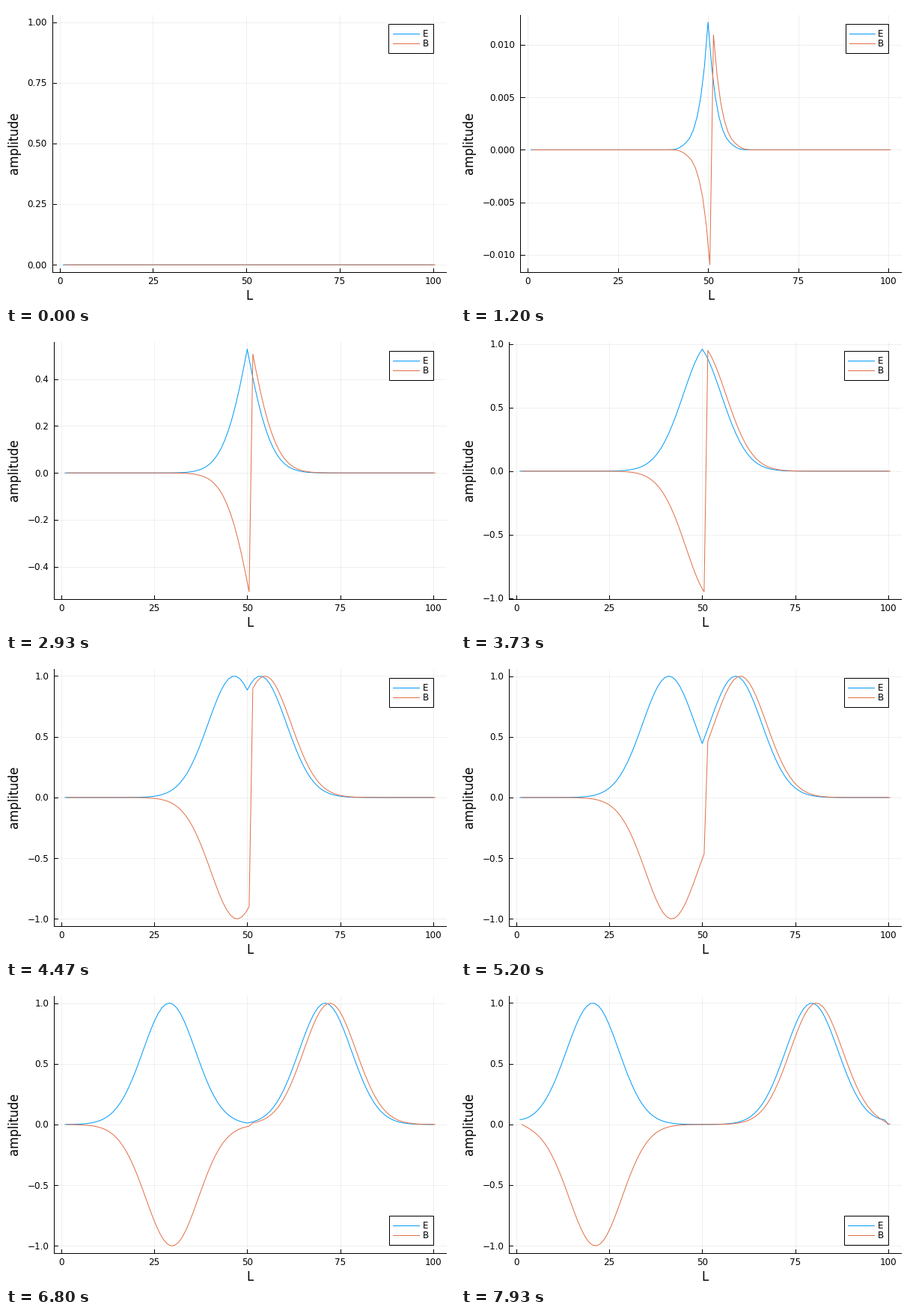
A matplotlib script for the animation above (8 s loop, 600 by 400 pixels).

```python
import math

import matplotlib.pyplot as plt
import numpy as np
from matplotlib.animation import FuncAnimation
from matplotlib.patches import Rectangle

W, H = 600, 400
STEPS, FRAMES, LOOP_MS = 120, 400, 8000
CELLS, SOURCE = 100, 50
TOP, BOTTOM, RIGHT = 11.81, 356.0, 588.19
PT = 0.72                       # points per pixel at 100 dpi
SMALL, LARGE = 12, 16.5         # font sizes in pixels
CAP_HALF = 0.3645               # half the digit height, in em
BLUE, ORANGE = "#009afa", "#e26f47"
NICE = ((1.0, 1.0), (5.0, 0.9), (2.0, 0.7), (2.5, 0.5), (3.0, 0.2))

xe = np.arange(1, CELLS + 1)
xb = xe + 0.5


def simulate():
    """One-dimensional field update driven by a Gaussian pulse in the middle."""
    e, b = np.zeros(CELLS + 1), np.zeros(CELLS + 1)
    states = [(e[1:].copy(), b[1:].copy())]
    for n in range(1, STEPS):
        e[1:CELLS] -= 0.5 * (b[2:] - b[1:CELLS])
        e[SOURCE] = math.exp(-((n - 60) / 20) ** 2)
        b[2:CELLS] -= 0.5 * (e[2:CELLS] - e[1:CELLS - 1])
        states.append((e[1:].copy(), b[1:].copy()))
    return states


def padded(lo, hi):
    if lo == hi:
        lo, hi = 0.0, 1.0
    pad = 0.03 * (hi - lo)
    return lo - pad, hi + pad


def find_ticks(lo, hi):
    """Score nice steps by tick count, coverage and roundness."""
    span = hi - lo
    best = None
    top = math.ceil(math.log10(span))
    for z in range(top, top - 4, -1):
        for q, roundness in NICE:
            step = q * 10.0 ** z
            first, last = math.ceil(lo / step), math.floor(hi / step)
            count = last - first + 1
            if not 4 <= count <= 8:
                continue
            score = (0.25 * (1 - abs(count - 5) / 5) + 0.25 * roundness
                     + 0.5 * span / ((count - 1) * step))
            key = (round(score, 9), -count)
            if best is None or key > best[0]:
                digits = max(0, -z + (q == 2.5))
                best = (key, [i * step for i in range(first, last + 1)], digits)
    return best[1], best[2]


def label(value, digits):
    return f"{value:.{digits}f}".replace("-", "\u2212")


def text_width(s):
    return sum({".": 0.318, "\u2212": 0.838}.get(c, 0.636) for c in s)


STATES = simulate()
XLIM = padded(xe[0], xb[-1])
XTICKS = (0, 25, 50, 75, 100)

fig = plt.figure(figsize=(W / 100, H / 100), dpi=100, facecolor="white")
ax = fig.add_axes([0, 0, 1, 1])
ax.set_xlim(0, W)
ax.set_ylim(H, 0)
ax.axis("off")
ax.set_autoscale_on(False)


def line(x, y, color="black", width=1.0, **kw):
    ax.plot(x, y, color=color, lw=width * PT, **kw)


def write(x, y, s, size=SMALL, **kw):
    ax.text(x, y, s, fontsize=size * PT, family="DejaVu Sans",
            va="baseline", **kw)


def draw_legend(left, top):
    x = 581.6 - 2 * (RIGHT - left) / 15
    ax.add_patch(Rectangle((x, top), 571 - x, 39, fc="white", ec="black",
                           lw=PT, zorder=5))
    start = x + (RIGHT - left) / 100 + 0.5
    end = start + (RIGHT - left) / 15
    for i, (name, color) in enumerate((("E", BLUE), ("B", ORANGE))):
        y = top + 13 * (i + 1)
        line([start, end], [y, y], color, zorder=6)
        write(557.2, y + CAP_HALF * SMALL, name, zorder=6)


def draw_plot(n):
    e, b = STATES[n]
    for artist in [*ax.lines, *ax.texts, *ax.patches]:
        artist.remove()

    lo, hi = padded(min(e.min(), b.min()), max(e.max(), b.max()))
    yticks, digits = find_ticks(lo, hi)
    names = [label(v, digits) for v in yticks]
    left = 34.9 + SMALL * max(map(text_width, names))

    def px(x):
        return left + (x - XLIM[0]) / (XLIM[1] - XLIM[0]) * (RIGHT - left)

    def py(y):
        return BOTTOM - (y - lo) / (hi - lo) * (BOTTOM - TOP)

    for v in XTICKS:
        x = px(v)
        line([x, x], [TOP, BOTTOM], alpha=0.06, zorder=1)
        line([x, x], [BOTTOM, BOTTOM - 5.2], zorder=2)
        write(x, 372, str(v), ha="center")
    for v, name in zip(yticks, names):
        y = py(v)
        line([left, RIGHT], [y, y], alpha=0.06, zorder=1)
        line([left, left + 5.2], [y, y], zorder=2)
        write(left - 6.9, y + CAP_HALF * SMALL, name, ha="right")

    line([left, left], [TOP, BOTTOM], zorder=2)
    line([left, RIGHT], [BOTTOM, BOTTOM], zorder=2)
    write((left + RIGHT) / 2, 392.7, "L", LARGE, ha="center")
    write(16.4, 183.4, "amplitude", LARGE, ha="center",
          rotation=90, rotation_mode="anchor")

    line(px(xe), py(e), BLUE, snap=False, zorder=3)
    line(px(xb), py(b), ORANGE, snap=False, zorder=4)

    # The legend drops down once a pulse enters the top right corner.
    xc = XLIM[0] + 0.75 * (XLIM[1] - XLIM[0])
    yc = lo + 0.75 * (hi - lo)
    crowded = (e[xe > xc] > yc).any() or (b[xb > xc] > yc).any()
    draw_legend(left, 305.5 if crowded else 23.5)


shown = None


def draw(frame):
    """Hold each step for 60 to 80 ms on a 20 ms clock."""
    global shown
    step = (3 * frame + 2) // 10
    if step != shown:
        draw_plot(step)
        shown = step
    return []


anim = FuncAnimation(fig, draw, frames=FRAMES, init_func=lambda: draw(0),
                     interval=LOOP_MS / FRAMES, repeat=True, repeat_delay=0,
                     blit=False)
plt.show()
```
